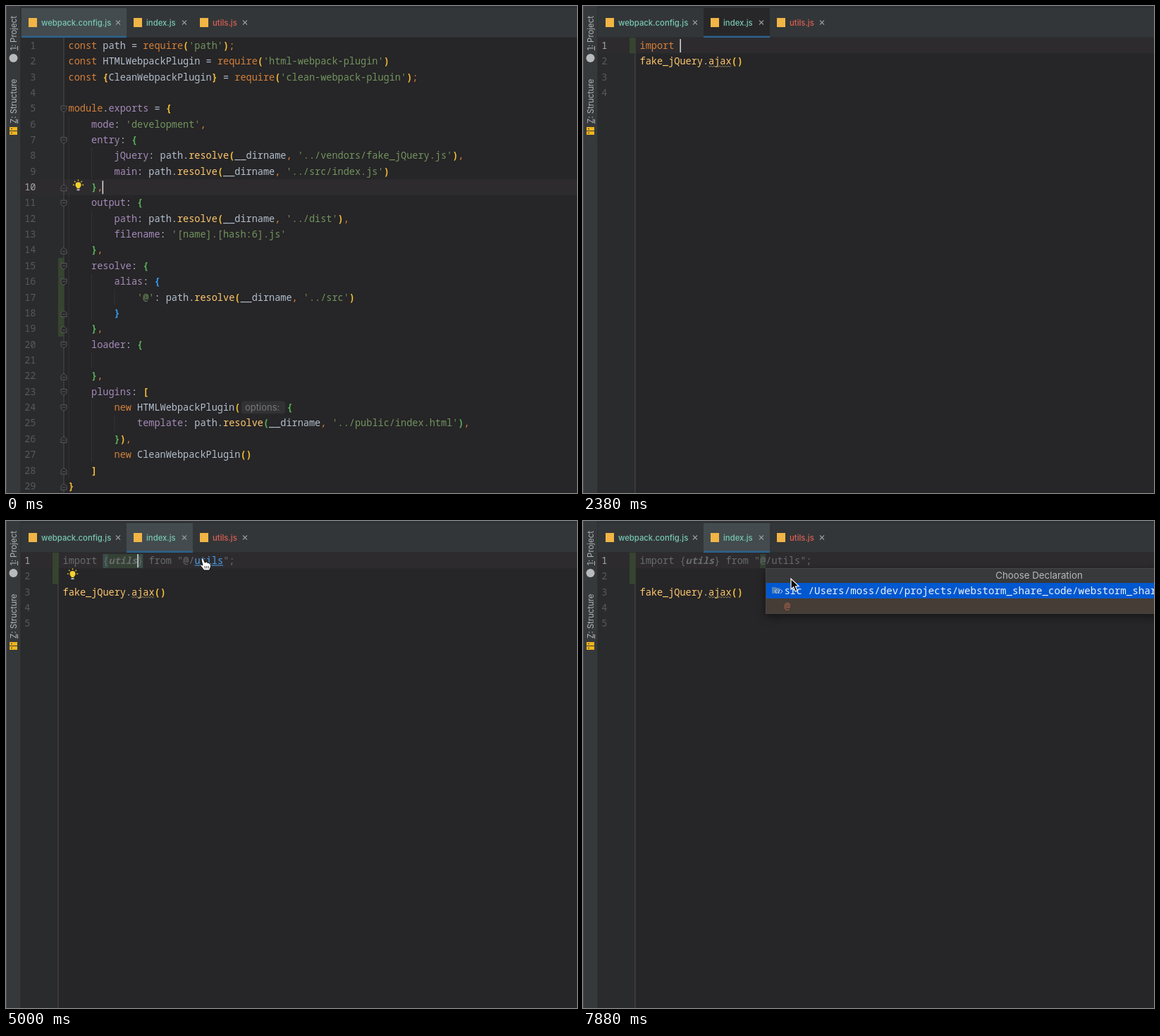
Write an HTML page with a canvas that moves like this. It is 810 by 692 pixels and loops after 8 s.

```html
<!DOCTYPE html>
<html lang="en">
<head>
<meta charset="utf-8">
<title>Editor</title>
<style>
html, body { margin: 0; width: 100%; height: 100%; overflow: hidden; background: #262527; }
canvas { display: block; width: 810px; height: 692px; }
</style>
</head>
<body>
<canvas id="stage" width="810" height="692"></canvas>
<script>
const ctx = document.getElementById('stage').getContext('2d');
const LOOP = 8000, STEP = 125;
const CH = 8.13, ROW = 22.36, POP_CH = 8.6, POP_ROW = 20.3;
const MONO = '"Noto Sans Mono", "DejaVu Sans Mono", monospace';
const SANS = 'Inter, Roboto, sans-serif';
const CODE = `13.55px ${MONO}`, POP = `14.33px ${MONO}`, UI = `500 11.3px ${SANS}`;
const rowY = n => 56 + (n - 1) * ROW;

// Token colours: a letter after § switches the colour
const INK = {
  k: '#d4803a', t: '#b2bfcd', p: '#a48bba', s: '#72945f', f: '#ffc96f',
  y: '#f0bd38', g: '#58b05b', b: '#359ff4', d: '#696b6d', i: '#696b6d',
  l: '#4a9ff0', w: '#c6cdd4', e: '#8a8c8e', m: '#2f6ba6'
};
const STYLE = { y: '600', g: '600', b: '600', i: 'italic 700' };

const CONFIG = [
  "§kconst §tpath = §krequire§y(§s'path'§y)§k;",
  "§kconst §tHTMLWebpackPlugin = §krequire§y(§s'html-webpack-plugin'§y)",
  "§kconst §y{§tCleanWebpackPlugin§y}§t = §krequire§y(§s'clean-webpack-plugin'§y)§k;",
  "",
  "§kmodule§t.§pexports§t = §y{",
  "    §pmode§t: §s'development'§k,",
  "    §pentry§t: §g{",
  "        §pjQuery§t: path.§fresolve§y(§t__dirname§k, §s'../vendors/fake_jQuery.js'§y)§k,",
  "        §pmain§t: path.§fresolve§y(§t__dirname§k, §s'../src/index.js'§y)",
  "    §g}§k,",
  "    §poutput§t: §g{",
  "        §ppath§t: path.§fresolve§y(§t__dirname§k, §s'../dist'§y)§k,",
  "        §pfilename§t: §s'[name].[hash:6].js'",
  "    §g}§k,",
  "    §presolve§t: §g{",
  "        §palias§t: §b{",
  "            §s'@'§t: path.§fresolve§y(§t__dirname§k, §s'../src'§y)",
  "        §b}",
  "    §g}§k,",
  "    §ploader§t: §g{",
  "",
  "    §g}§k,",
  "    §pplugins§t: §y[",
  "        §knew §tHTMLWebpackPlugin§y(",
  "            §ptemplate§t: path.§fresolve§g(§t__dirname§k, §s'../public/index.html'§g)§k,",
  "        §g}§y)§k,",
  "        §knew §tCleanWebpackPlugin§y()",
  "    §y]",
  "§y}"
];
const CALL = "§ffake_jQuery§t.§fajax§y()";

const SUGGEST = [
  ['', '§mi§wmport'], ['', '§mi§wmport()'], ['', '§mi§wf'], ['', 'th§mi§ws'], ['', 'funct§mi§won'],
  ['f', '§mi§wmportScripts(...urls: string[]) (built-in)', 'void'],
  ['x', '§mi§wndexedDB (DOM)', 'IDBFactory'],
  ['x', '§mi§wnnerHeight (DOM)', 'number'],
  ['x', '§mi§wnnerWidth (DOM)', 'number'],
  ['x', '§mi§wnstalledClis (webpack)'],
  ['x', '§mi§wnstallOptions', '[(string | string), string]'],
  ['f', '§mi§wsFinite(number: number) (built-in)', 'boolean']
];

function rect(x, y, w, h, color) {
  ctx.fillStyle = color;
  ctx.fillRect(x, y, w, h);
}

function text(str, x, y, color, font = UI, align = 'left') {
  ctx.font = font;
  ctx.fillStyle = color;
  ctx.textAlign = align;
  ctx.fillText(str, x, y);
}

function line(pts, color, width = 1, fill) {
  ctx.beginPath();
  pts.forEach(([x, y], i) => i ? ctx.lineTo(x, y) : ctx.moveTo(x, y));
  if (fill) {
    ctx.closePath();
    ctx.fillStyle = fill;
    ctx.fill();
  }
  ctx.strokeStyle = color;
  ctx.lineWidth = width;
  ctx.stroke();
}

function disc(x, y, r, color) {
  ctx.beginPath();
  ctx.arc(x, y, r, 0, 7);
  ctx.fillStyle = color;
  ctx.fill();
}

function tokens(str, x, y, font = CODE, ch = CH, ink = 't', weight = '500') {
  str.split('§').forEach((part, i) => {
    const key = i ? part[0] : ink, word = i ? part.slice(1) : part;
    text(word, x, y, INK[key], `${STYLE[key] || weight} ${font}`);
    x += word.length * ch;
  });
}

function wave(x, end, y, color) {
  const pts = [];
  for (let i = 0; x + i * 2 <= end; i++) pts.push([x + i * 2, y + (i % 2 ? 1 : -1)]);
  line(pts, color, 1);
}

function fold(x, y, dir) {
  const pts = [[-4, -4.5], [4, -4.5], [4, 1], [0, 4.5], [-4, 1], [-4, -4.5]];
  line(pts.map(([a, b]) => [x + a, y + b * dir]), '#58595b', 1, '#28282a');
  line([[x - 2, y - dir], [x + 2, y - dir]], '#58595b');
}

function bulb(x, y) {
  disc(x, y - 1, 4, '#f5d130');
  rect(x - 2, y + 2, 4, 2, '#f5d130');
  rect(x - 2, y + 5, 4, 2, '#b9babb');
  for (let a = -4; a <= 0; a++) {
    const c = Math.cos(a * Math.PI / 4), s = Math.sin(a * Math.PI / 4);
    line([[x + c * 5.7, y - 1 + s * 5.7], [x + c * 7.6, y - 1 + s * 7.6]], '#f5d130', 1.3);
  }
}

function arrow(x, y) {
  const pts = [[0, 0], [0, 15], [3.6, 11.8], [6.2, 18], [9, 16.8], [6.4, 10.8], [11, 10.6], [0, 0]];
  line(pts.map(([a, b]) => [x + a, y + b]), '#f2f2f2', 1.3, '#050505');
}

function hand(x, y) {
  ctx.save();
  ctx.translate(x, y);
  ctx.beginPath();
  ctx.moveTo(-4, 1);
  ctx.quadraticCurveTo(-3, -3, -1, 0);
  ctx.lineTo(1, 5);
  ctx.quadraticCurveTo(4, 3, 5, 5.5);
  ctx.quadraticCurveTo(8, 4.5, 8, 7);
  ctx.quadraticCurveTo(10.5, 7, 9.5, 11);
  ctx.lineTo(7.5, 16);
  ctx.lineTo(0, 16);
  ctx.lineTo(-5.5, 9);
  ctx.quadraticCurveTo(-5, 7, -2, 9);
  ctx.closePath();
  ctx.fillStyle = '#fff';
  ctx.fill();
  ctx.strokeStyle = '#111';
  ctx.lineWidth = 1;
  ctx.stroke();
  for (const i of [1, 3.5, 6]) line([[i, 10], [i + .4, 13.5]], '#222', .9);
  ctx.restore();
}

function panel(x, y, w, h, color) {
  ctx.save();
  ctx.shadowColor = 'rgba(0,0,0,.45)';
  ctx.shadowBlur = 12;
  ctx.shadowOffsetY = 4;
  rect(x, y, w, h, color);
  ctx.restore();
  ctx.strokeStyle = '#45474a';
  ctx.lineWidth = 1;
  ctx.strokeRect(x + .5, y + .5, w - 1, h - 1);
}

function sideLabel(label, bottom) {
  ctx.save();
  ctx.translate(14.5, bottom);
  ctx.rotate(-Math.PI / 2);
  text(label, 0, 0, '#b4b6b8', `11.4px ${SANS}`);
  rect(0, 1.5, 6, 1, '#b4b6b8');
  ctx.restore();
}

function sidebar() {
  rect(0, 0, 21, 692, '#36393b');
  rect(0, 0, 1, 692, '#4b4d4f');
  rect(20, 0, 1, 692, '#2d2f31');
  sideLabel('1: Project', 63);
  disc(10.5, 74, 6, '#b9babc');
  sideLabel('Z: Structure', 167);
  rect(5, 172, 11, 5, '#f0b41c');
  rect(5, 178, 11, 5, '#f0b41c');
  rect(7, 174, 2, 1, '#36393b');
  rect(7, 180, 2, 1, '#36393b');
}

function tabs(s) {
  rect(21, 0, 789, 45, '#333638');
  rect(21, 0, 789, 3, '#2e3133');
  rect(21, 44, 789, 1, '#2b2d2f');
  const list = [
    ['webpack.config.js', 22, 171, '#78c8b4'],
    ['index.js', 171, 265, '#78c8b4'],
    ['utils.js', 265, 351, '#dc5f55']
  ];
  list.forEach(([name, x, end, color], i) => {
    const active = i === s.tab, hot = active && s.closeHot;
    if (active) {
      rect(x, 3, end - x, 41, s.lit ? '#434b4f' : '#272729');
      rect(x, 42.5, end - x, 2.5, '#2c628c');
    }
    rect(x + 10, 17, 12, 13, '#f0b545');
    text(name, x + 28, 27.5, color);
    const cx = end - 12, cy = 23.5;
    if (hot) disc(cx, cy, 6.5, '#2675bf');
    const ink = hot ? '#1e2a35' : '#9a9c9e';
    line([[cx - 3, cy - 3], [cx + 3, cy + 3]], ink, 1.1);
    line([[cx + 3, cy - 3], [cx - 3, cy + 3]], ink, 1.1);
  });
  if (s.error) wave(199, 241, 31, '#c0453f');
}

function gutter(edge, count, active) {
  rect(21, 45, edge - 21, 647, '#292b2d');
  rect(21, rowY(active) - 11, 789, ROW, '#2d2b2e');
  rect(edge - .5, 45, 1, 647, '#4d4c4b');
  for (let n = 1; n <= count; n++)
    text(n, edge - 39.5, rowY(n) + 4.8, n === active ? '#a5a6a7' : '#58595c', CODE, 'right');
}

function changed(edge, from, to) {
  rect(edge - 8, rowY(from) - 11, 8, (to - from + 1) * ROW, '#36452f');
}

function guide(col, from, to) {
  rect(88.5 + col * CH, rowY(from) - 11, 1, (to - from + 1) * ROW, '#353337');
}

function caret(x, y) {
  rect(x, y - 9, 1.6, 19, '#d0d0d0');
}

function config() {
  gutter(82, 29, 10);
  changed(82, 15, 19);
  guide(0, 6, 28);
  [[8, 9], [12, 13], [16, 18], [21, 21], [24, 27]].forEach(r => guide(4, ...r));
  guide(8, 17, 17);
  guide(8, 25, 25);
  [5, 7, 11, 15, 16, 20, 23, 24].forEach(n => fold(82, rowY(n) + 1, 1));
  [10, 14, 18, 19, 22, 26, 28, 29].forEach(n => fold(82, rowY(n) + 1, -1));
  CONFIG.forEach((str, i) => tokens(str, 88.5, rowY(i + 1) + 4.8));
  const y = rowY(24);
  ctx.beginPath();
  ctx.roundRect(334, y - 9, 62, 18, 4);
  ctx.fillStyle = '#323234';
  ctx.fill();
  text('options:', 339, y + 4.5, '#76787a', `13px ${SANS}`);
  tokens('§g{', 398.5, y + 4.8);
  bulb(102.5, rowY(10) - 2);
  caret(136.5, rowY(10));
}

function mark(col, len, color) {
  rect(80.5 + col * CH, 47, len * CH, 20, color);
}

function index(s) {
  gutter(74, s.full ? 5 : 4, 1);
  changed(74, 1, s.full ? 2 : 1);
  (s.marks || []).forEach(m => mark(...m));
  tokens(s.code, 80.5, 60.8);
  if (s.link) rect(80.5 + s.link[0] * CH, 62.5, s.link[1] * CH, 1, INK.l);
  const y = rowY(s.full ? 3 : 2);
  tokens(s.error ? '§efake_jQuery.ajax()' : CALL, 80.5, y + 4.8);
  wave(178, 211, y + 7.5, '#8f845c');
  if (s.error) {
    fold(74, 57, 1);
    fold(74, 79, -1);
  }
  if (s.bulb) bulb(94.5, 76);
  if (s.caret !== undefined) caret(80.5 + s.caret * CH, 56);
}

const TIP = '#2f5f95';

function keyHint(x, y, dir) {
  line([[x, y], [x + 3.5, y - 4], [x + 7, y]], TIP, 1.2);
  const ax = x + 12.5, tip = y + dir * 4;
  line([[ax, y - dir * 4], [ax, tip]], TIP, 1.2);
  line([[ax - 3, tip - dir * 3], [ax, tip], [ax + 3, tip - dir * 3]], TIP, 1.2);
}

function tipBar(x, y, w) {
  rect(x + 1, y - 10, w - 2, 20, '#333537');
  keyHint(x + 6, y, 1);
  text('and', x + 27, y + 4, TIP);
  keyHint(x + 52, y, -1);
  text('will move caret down and up in the editor', x + 73, y + 4, TIP);
  text('Next Tip', x + 305, y + 4, '#4b98f0');
  for (const d of [-4, 0, 4]) rect(x + w - 14, y + d - 1, 2.6, 2.6, '#e8b92c');
}

function kind(type, x, y) {
  if (type === 'f') text('f', x + 3, y, '#b57edc', 'italic 500 14.2px ' + MONO);
  if (type === 'x') text('(x)', x - 1, y, '#4fb8cc', `italic 12.5px ${SANS}`);
}

function suggestions() {
  panel(54, 67, 550, 256, '#36383a');
  rect(55, 68, 548, 20, '#4b4d4f');
  rect(595, 70, 7, 23, '#2a4b6e');
  ctx.save();
  ctx.beginPath();
  ctx.rect(54, 67, 550, 234);
  ctx.clip();
  SUGGEST.forEach(([type, str, result], i) => {
    const y = 82.3 + i * POP_ROW;
    kind(type, 61, y);
    tokens(str, 80.5, y, POP, POP_CH, 'w', type ? '500' : '600');
    if (result) text(result, 593, y, '#bcbec0', '500 ' + POP, 'right');
  });
  ctx.restore();
  tipBar(54, 312, 550);
}

function utilsHint() {
  panel(119, 67, 550, 43, '#36383a');
  rect(120, 68, 548, 20, '#4b4d4f');
  kind('x', 126, 82);
  tokens('§mu§wtils (utils.js)', 145.5, 82.3, POP, POP_CH);
  tipBar(119, 99, 550);
}

function declarations() {
  const font = `500 14.2px ${MONO}`;
  panel(259, 67, 560, 65, '#463d36');
  rect(260, 68, 550, 20, '#37393b');
  rect(260, 88, 550, 22, '#0058d0');
  text('Choose Declaration', 647, 82, '#b6b8ba', `13.3px ${SANS}`, 'center');
  rect(268, 94, 6, 3, '#4f83bd');
  rect(268, 95, 11, 8, '#4f83bd');
  line([[275, 97], [272, 100], [275, 103]], '#bcd3ee');
  line([[279, 97], [277, 103]], '#bcd3ee');
  line([[280, 97], [283, 100], [280, 103]], '#bcd3ee');
  text('src /Users/moss/dev/projects/webstorm_share_code/webstorm_share_code/src', 285.5, 104, '#eef3fa', font);
  text('@', 285.5, 125.5, '#a8644c', font);
}

const PATH = [
  [4500, 368, 160], [4875, 281, 54], [5375, 281, 54], [6125, 234, 24], [6250, 234, 24],
  [6500, 247, 39], [6625, 248, 41], [7000, 255, 54], [7375, 255, 54], [7750, 295, 82], [8000, 295, 82]
];

function pointer(t) {
  if (t < PATH[0][0]) return null;
  const i = PATH.findIndex(p => p[0] > t);
  const [t0, x0, y0] = PATH[i - 1], [t1, x1, y1] = PATH[i];
  const u = (t - t0) / (t1 - t0), e = u * u * (3 - 2 * u);
  return [x0 + (x1 - x0) * e, y0 + (y1 - y0) * e];
}

function state(t) {
  if (t < 500) return { tab: 0, lit: true };
  if (t < 1500) return { tab: 1, code: '', caret: 0 };
  if (t < 2000) return { tab: 1, code: 'i', caret: 1, popup: t >= 1625 && suggestions };
  if (t < 2125) return { tab: 1, code: '§kimport', caret: 6 };
  if (t < 2875) return { tab: 1, code: '§kimport ', caret: 7 };
  const brace = '#3a4d49', same = '#344134';
  if (t < 3250) return { tab: 1, code: '§kimport §w{}', caret: 8, error: true, marks: [[7, 2, brace]] };
  if (t < 4000) return {
    tab: 1, code: '§kimport §w{u}', caret: 9, error: true,
    marks: [[7, 1, brace], [9, 1, brace]], popup: t >= 3375 && utilsHint
  };
  if (t < 5375) {
    const link = t >= 4875;
    return {
      tab: 1, full: true, lit: t >= 4750, bulb: t >= 4500, caret: 13, link: link && [23, 5],
      code: `§dimport {§iutils§d} from "@/§${link ? 'l' : 'd'}utils§d";`,
      marks: [[7, 1, brace], [8, 5, same], [13, 1, brace]]
    };
  }
  if (t < 6250) return { tab: 2 };
  const link = t >= 7000 && t < 7375, picked = t >= 7375;
  return {
    tab: 1, full: true, lit: t >= 6750, closeHot: t >= 6375 && t < 6750,
    code: `§dimport {§iutils§d} from "§${link ? 'l' : 'd'}@§d/utils";`,
    caret: t >= 7500 ? undefined : picked ? 22 : 24,
    marks: [picked ? [21, 1, same] : [23, 5, same]],
    link: link && [21, 1], popup: t >= 7500 && declarations
  };
}

function draw(t) {
  const s = state(t);
  rect(0, 0, 810, 692, '#262527');
  if (s.tab === 0) config();
  else if (s.tab === 1) index(s);
  else {
    gutter(74, 5, 1);
    caret(80.5, 56);
  }
  tabs(s);
  sidebar();
  if (s.popup) s.popup();
  const at = pointer(t);
  if (at) (s.link ? hand : arrow)(...at);
}

function frame(now) {
  draw(Math.floor(now % LOOP / STEP) * STEP);
  requestAnimationFrame(frame);
}
requestAnimationFrame(frame);
</script>
</body>
</html>
```
